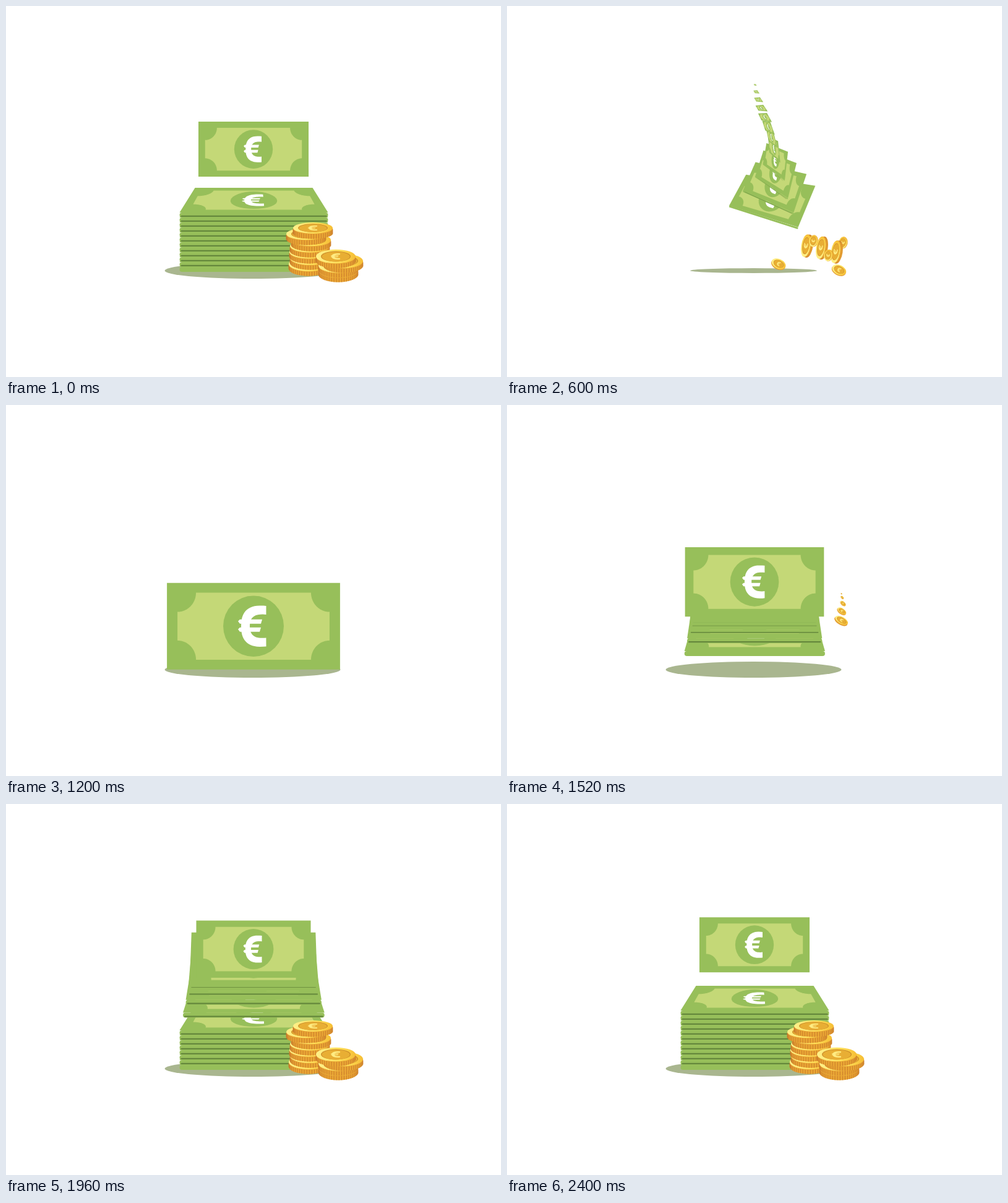
Recreate the animation shown at these times as an HTML page with a canvas. Size 800 px wide and 600 px high, loop 2.44 s.

```html
<!DOCTYPE html>
<html lang="en">
<head>
<meta charset="utf-8">
<title>Money stack</title>
<style>
  html, body { margin: 0; width: 100%; height: 100%; overflow: hidden; background: #fff; }
  canvas { display: block; }
</style>
</head>
<body>
<canvas id="stage" width="800" height="600"></canvas>
<script>
const ctx = document.getElementById('stage').getContext('2d');
const LOOP = 2440, TURN = 1000, BILLS = 13, LAYER = 8;
const GREEN = '#97bf5a', LIGHT = '#c4d877', DARK = '#65883c';

const clamp = x => Math.max(0, Math.min(1, x));
const lerp = (a, b, p) => a + (b - a) * p;
const mix = (a, b, p) => a.map((v, i) => lerp(v, b[i], p));

// Linear interpolation over rows of [time, ...values].
function track(keys, t) {
  const next = keys.findIndex(k => k[0] > t);
  if (next <= 0) return keys.at(next).slice(1);
  const [a, b] = [keys[next - 1], keys[next]];
  return mix(a, b, (t - a[0]) / (b[0] - a[0])).slice(1);
}

// ---- shapes ----
function poly(points, map, color) {
  ctx.beginPath();
  points.forEach(([x, y]) => ctx.lineTo(...map(x, y)));
  ctx.closePath();
  ctx.fillStyle = color;
  ctx.fill();
}

// Elliptic arc; a power below 1 makes it squarer.
function arc(cx, cy, rx, ry, from, to, power = 1) {
  const bend = v => Math.sign(v) * Math.abs(v) ** power;
  return Array.from({ length: 33 }, (_, i) => {
    const a = lerp(from, to, i / 32) * Math.PI / 180;
    return [cx + rx * bend(Math.cos(a)), cy + ry * bend(Math.sin(a))];
  });
}

const NOTE_CIRCLE = arc(0, 0, 49, 49, 0, 360);
const NOTE_PANEL = [
  ...arc(-123, -54, 30, 31, 90, 0), ...arc(123, -54, 30, 31, 180, 90),
  ...arc(123, 54, 30, 31, 270, 180), ...arc(-123, 54, 30, 31, 0, -90)
];
const bar = (y, right) => [[-22, y], [right, y], [right - 2, y + 7], [-22, y + 7], [-25, y + 3]];
const EURO = [
  [...arc(12, 0, 32, 33, -79, -281, .8), ...arc(14, 0, 20, 19, 76, 284, .8)],
  bar(-11, 14), bar(2, 12)
];
const euro = (map, color) => EURO.forEach(part => poly(part, map, color));

function drawBill({ q, thick }, hasLine) {
  const map = (x, y) => {
    const u = x / 280 + .5, v = y / 139 + .5;
    return [0, 1].map(k => lerp(lerp(q[k], q[k + 2], u), lerp(q[k + 6], q[k + 4], u), v));
  };
  if (thick > .3) {
    const edge = (inset, drop, width, color) => {
      ctx.beginPath();
      ctx.moveTo(q[6] + inset, q[7] + drop);
      ctx.lineTo(q[4] - inset, q[5] + drop);
      ctx.lineWidth = width;
      ctx.lineCap = 'round';
      ctx.strokeStyle = color;
      ctx.stroke();
    };
    edge(thick / 2, thick / 2, thick, GREEN);
    if (hasLine) edge(3, thick * .74, thick * .28, DARK);
  }
  poly([[-140, -69.5], [140, -69.5], [140, 69.5], [-140, 69.5]], map, GREEN);
  poly(NOTE_PANEL, map, LIGHT);
  poly(NOTE_CIRCLE, map, GREEN);
  euro(map, '#fff');
}

// ---- bills: corners run top left, top right, bottom right, bottom left ----
// Half axes of a bill as it spins away: time, right x, y, down x, y.
const SPIN = [
  [150, 107.5, 0, 0, 20], [280, 61, 13, -15, 30], [340, 27, 14, -7, 25],
  [400, 6, 5, 2.5, 14], [480, 8, 0, 3.5, 5.5], [600, 0, 0, 0, 0]
];

function flying(s, i) {
  s = Math.max(s, 150);
  const [rx, ry, dx, dy] = track(SPIN, s);
  const rise = (s - 150) / 450, tilt = clamp((s - 150) / 130);
  const cx = 400.5 + 34 * Math.sin(Math.PI * rise ** .85) ** 2.2;
  const cy = 306 - 189 * rise + 16 * Math.sin(Math.PI * tilt)
    + LAYER * i * clamp((560 - s) / 410);
  const taper = lerp(.116, .03, tilt), lean = .13 * tilt;
  return [[-1, -1], [1, -1], [1, 1], [-1, 1]].flatMap(([u, v]) => {
    const a = u * (1 + taper * v), b = v * (1 + lean * u);
    return [cx + a * rx + b * dx, cy + a * ry + b * dy];
  });
}

const flat = i => flying(0, i);
const upright = (w, top, bottom) =>
  [400 - w / 2, top, 400 + w / 2, top, 400 + w / 2, bottom, 400 - w / 2, bottom];

// The leading bill drifts up and away, hovers, then starts to fall.
function leader(t) {
  const far = 1 - (1 - clamp((t - 1200) / 1100)) ** 2.27;
  const w = lerp(280, 178, far), fall = 6 * Math.max(0, (t - 2340) / 100) ** 2;
  const bottom = lerp(358, 225.5, far) + w / 4 + fall;
  return { w, bottom, top: bottom - w / 2 * clamp((t - 1020) / 140) };
}

function leaving(t, i) {
  const s = t - 26 * i;
  if (s >= 600) return null;
  if (i === 0 && s < 150) {
    const x = s / 150, p = .17 * x + .83 * x * x;
    const { w, top, bottom } = leader(LOOP);
    return { q: mix(upright(w, top, bottom), flat(0), p), thick: LAYER * p };
  }
  return {
    q: flying(s, i),
    thick: LAYER * (1 - .6 * clamp((s - 150) / 60)) * clamp((400 - s) / 120)
  };
}

function arriving(t, i) {
  const { w, top, bottom } = leader(t);
  if (i === 0) return t > 1020 ? { q: upright(w, top, bottom), thick: 0 } : null;
  if (t < 1320) return null;
  const p = clamp((t - 1630 - (5 - i) * 54) / 330) ** 2;
  const base = bottom + 8 * clamp((t - 1320) / 200);
  return { q: mix(upright(202, base - 93, base), flat(i), p), thick: LAYER * clamp(3 * p) };
}

// ---- coins ----
const PILES = [
  { xs: [496, 485, 493, 491, 490, 491, 489], top: 359, step: 9.7, roll: -50 },
  { xs: [533, 545, 537, 537], top: 405, step: 7.3, roll: 0 }
];
// Bottom coins first; slot is the place in the row of airborne coins.
const COINS = PILES.flatMap(({ xs, top, step, roll }, right) => xs.map((x, k) => ({
  x, y: top + step * k, roll,
  height: right ? 0 : 6 - k,
  slot: right ? 3 + k : 5 - k,
  bottom: k === xs.length - 1,
  order: (right ? 3 : 10) - k
})).reverse());

function drawCoin(x, y, r, ratio, turn) {
  if (r < .5) return;
  const ry = r * ratio, thick = r * .38 * (1 - ratio);
  const oval = (scale, dy, color) => {
    ctx.beginPath();
    ctx.ellipse(0, dy, r * scale, ry * scale, 0, 0, 7);
    ctx.fillStyle = color;
    ctx.fill();
  };
  ctx.save();
  ctx.translate(x, y);
  ctx.rotate(turn);
  oval(1, thick, '#e9a634');
  ctx.fillRect(-r, 0, 2 * r, thick);
  ctx.beginPath();
  for (let a = .1; a < Math.PI; a += .13) {
    const px = r * Math.cos(a), py = ry * Math.sin(a);
    ctx.moveTo(px, py + 1);
    ctx.lineTo(px, py + thick);
  }
  ctx.lineWidth = r / 32;
  ctx.lineCap = 'butt';
  ctx.strokeStyle = '#c97b2c';
  ctx.stroke();
  const shine = ctx.createLinearGradient(-r, 0, r, 0);
  shine.addColorStop(0, '#fff08a');
  shine.addColorStop(.6, '#ffdf58');
  shine.addColorStop(1, '#f6be35');
  oval(1, 0, shine);
  oval(.75, 0, '#c98a28');
  oval(.71, ry * .03, '#e8ae34');
  euro((px, py) => [px * r / 95, py * ry / 75], '#ffec83');
  ctx.restore();
}

function coinPose(t, { x, y, roll, height, slot, bottom, order }) {
  const rest = [x, y, 32, .28 + (y - 359) * .0015, 0];
  if (t > TURN) {
    const p = clamp((t - 1390 - order * 25) / 250), fall = p ** 1.5;
    return [lerp(543, x, fall), lerp(300, y, fall), 32 * p ** 1.6,
      lerp(.6, rest[3], p), 1.1 * (1 - p)];
  }
  const curl = (height / 6) ** 12;
  const lifted = [x + 36 * curl, y - 7.3 * height + 48 * curl,
    32 - 3.2 * height, height ? .55 : rest[3] + .08, -.22 * height];
  const parity = slot % 2 ? -1 : 1;
  let air = [483 + 12 * slot, 392 - 12 * Math.cos(1.36 * (slot - .9)),
    14 + 4.5 * parity, .55 - .15 * parity, -1.4];
  if (bottom) air = [x + roll, y, 12, .65, .45];
  if (height > 3) air = [489, 344, 0, .2, -2.4];
  const gone = [lerp(air[0], 480, .5), air[1] - 45, 0, air[3], air[4] * 1.6];
  return track([[90, ...rest], [280, ...lifted], [600, ...air], [780, ...gone]], t);
}

// ---- scene ----
function drawShadow(t) {
  const gone = t < TURN ? clamp((t - 420) / 260) : 1 - clamp((t - TURN) / 160);
  ctx.beginPath();
  ctx.ellipse(398.5, 428, 142 * (1 - .4 * gone), 13 * (1 - gone), 0, 0, 7);
  ctx.fillStyle = '#a9b68f';
  ctx.fill();
}

function draw(t) {
  ctx.fillStyle = '#fff';
  ctx.fillRect(0, 0, 800, 600);
  drawShadow(t);
  for (let i = BILLS - 1; i >= 0; i--) {
    const bill = t < TURN ? leaving(t, i) : arriving(t, i);
    if (bill) drawBill(bill, i < BILLS - 1);
  }
  COINS.forEach(coin => drawCoin(...coinPose(t, coin)));
}

const start = performance.now();
function frame() {
  draw((performance.now() - start) % LOOP);
  requestAnimationFrame(frame);
}
frame();
</script>
</body>
</html>
```
